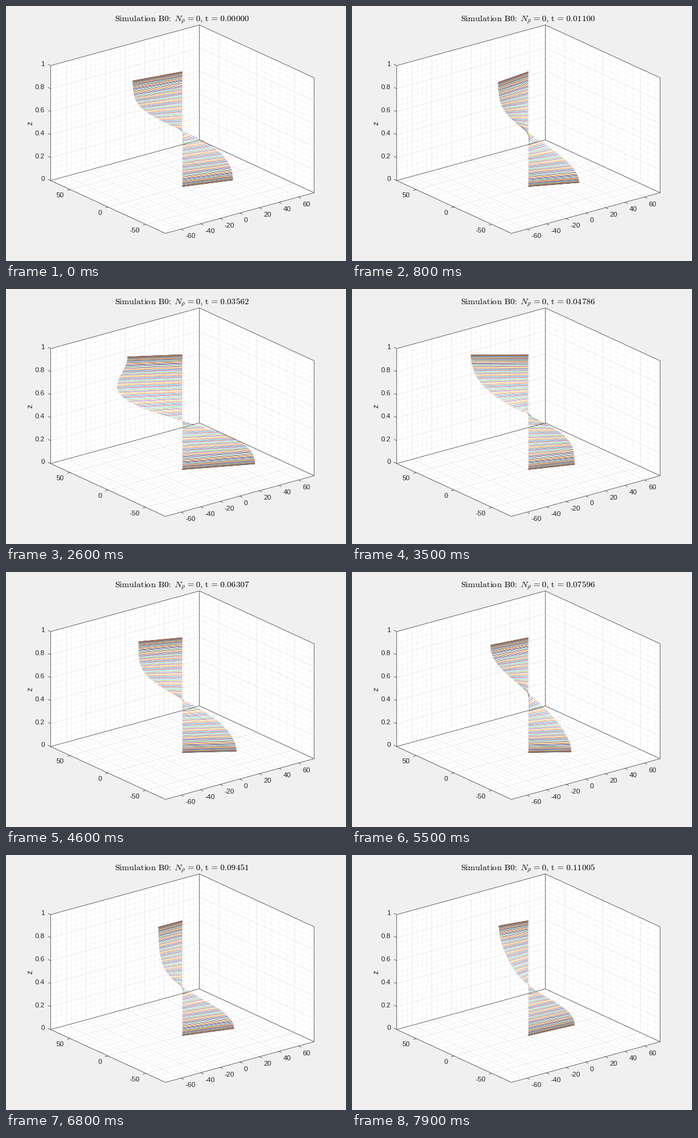
Recreate the animation shown at these times as a matplotlib script. Size 560 by 420 pixels, loop 8000 ms.

```python
import numpy as np
import matplotlib.pyplot as plt
from matplotlib.animation import FuncAnimation
from matplotlib.collections import LineCollection

W, H, DPI = 560, 420, 100
FRAMES, STEP = 80, 100
LOOP = FRAMES * STEP
PT = 72 / DPI                      # points per pixel
INK = "#262626"
LIM = 76                           # half width of the x and y axes
ORDER = ["#0072BD", "#D95319", "#EDB120", "#7E2F8E",
         "#77AC30", "#4DBEEE", "#A2142F"]

plt.rcParams["mathtext.fontset"] = "cm"
plt.rcParams["font.family"] = "Liberation Sans"

fig = plt.figure(figsize=(W / DPI, H / DPI), dpi=DPI, facecolor="#f0f0f0")
ax = fig.add_axes([0, 0, 1, 1])
ax.set_xlim(0, W)
ax.set_ylim(H, 0)
ax.axis("off")


def project(x, y, z):
    """Data coordinates to stage pixels."""
    u, v = x / LIM, y / LIM
    return 290.5 + 122.5 * u - 94.5 * v, 297.5 - 33.5 * u - 43.5 * v - 189.3 * z


def strokes(segs, width=0.7, color=INK, **kw):
    lines = LineCollection(segs, linewidths=width * PT, colors=color,
                           snap=False, **kw)
    ax.add_collection(lines)
    return lines


def label(x, y, s, ha):
    ax.text(x, y + 4, s, ha=ha, va="baseline", size=11.5 * PT, color=INK)


def grid(xs, ys, zs):
    """Grid lines on the floor and the two back walls."""
    segs = []
    for x in xs:
        segs.append([project(x, -LIM, 0), project(x, LIM, 0)])
        segs.append([project(x, LIM, 0), project(x, LIM, 1)])
    for y in ys:
        segs.append([project(-LIM, y, 0), project(LIM, y, 0)])
        segs.append([project(LIM, y, 0), project(LIM, y, 1)])
    for z in zs:
        segs.append([project(-LIM, LIM, z), project(LIM, LIM, z)])
        segs.append([project(LIM, LIM, z), project(LIM, -LIM, z)])
    return segs


def draw_box():
    left, back, right, front = [(-LIM, LIM), (LIM, LIM), (LIM, -LIM), (-LIM, -LIM)]
    low = {c: project(*c, 0) for c in (left, back, right, front)}
    top = {c: project(*c, 1) for c in (left, back, right)}
    outline = [low[left], low[front], low[right], top[right], top[back], top[left]]
    ax.add_patch(plt.Polygon(outline, fc="white", ec="none"))

    xs, ys, zs = range(-60, 61, 20), (-50, 0, 50), np.arange(0, 1.01, 0.2)
    minor = grid([x for x in range(-75, 76, 5) if x % 20],
                 [y for y in range(-70, 71, 10) if y % 50],
                 [k / 20 for k in range(1, 20) if k % 4])
    strokes(minor, 0.7, (0.1, 0.1, 0.1, 0.27), linestyles=[(0, (1, 4))])
    strokes(grid(xs, ys, zs[1:-1]), 0.7, (0.15, 0.15, 0.15, 0.13))

    edges = [[low[left], low[front]], [low[front], low[right]],
             [low[left], low[back]], [low[back], low[right]],
             [top[left], top[back]], [top[back], top[right]]]
    edges += [[low[c], top[c]] for c in top]
    for v in xs:
        x, y = project(v, -LIM, 0)
        edges.append([(x, y), (x + 4.5, y + 2.1)])
        label(x + 7, y + 11, str(v), "left")
    for v in ys:
        x, y = project(-LIM, v, 0)
        edges.append([(x, y), (x - 4.8, y + 1.3)])
        label(x - 10, y + 9, str(v), "right")
    for v in zs:
        x, y = project(-LIM, LIM, v)
        edges.append([(x, y), (x - 4.5, y - 2.1)])
        label(x - 10, y - 3, f"{v:.1g}", "right")
    strokes(edges, 0.65)
    ax.text(40, 193, "z", rotation=90, ha="center", va="center",
            size=12.7 * PT, color=INK)


# Turning points of the flow: time in ms, swing and skew in pixels
KEYS = np.array([
    (0, 88, 5), (400, 118, 8), (900, 53, 17), (1700, 30, 8), (2700, 124, 26),
    (3500, 92, -4), (3850, 110, 2), (4600, 85, 12), (5500, 65, 3),
    (5950, 93, -1), (6800, 59, 20), (7300, 94, 6), (7900, 59, 11)], float)
TIMES, POSES = KEYS[:, 0], KEYS[:, 1:]
SPEEDS = np.gradient(POSES, TIMES, axis=0)

# The solver's clock runs at slightly varying speed
CLOCK = ([0, 1700, 3500, 4600, 5500, 6800, 7900],
         [0, 0.02338, 0.04786, 0.06307, 0.07596, 0.09451, 0.11005])

# Rows crowd towards the walls
ROWS = 128
Z = (1 - np.cos(np.pi * np.arange(ROWS) / (ROWS - 1))) / 2
C1, C2, C3 = (np.cos(k * np.pi * Z) for k in (1, 2, 3))
BASE = np.array([project(0, 0, z) for z in Z])


def wave(ms, period, peak=0):
    return np.cos(2 * np.pi * (ms - peak) / period)


def pose(ms):
    """Swing and skew on a smooth curve through the turning points."""
    k = min(np.searchsorted(TIMES, ms, side="right") - 1, len(TIMES) - 2)
    h = TIMES[k + 1] - TIMES[k]
    s = (ms - TIMES[k]) / h
    return ((1 + 2 * s) * (1 - s) ** 2 * POSES[k]
            + s * (1 - s) ** 2 * h * SPEEDS[k]
            + s * s * (3 - 2 * s) * POSES[k + 1]
            + s * s * (s - 1) * h * SPEEDS[k + 1])


def tips(ms):
    swing, skew = pose(ms)
    slack = 0.3 * (70 - swing)     # a weak swing lets the third mode through
    dx = swing * C1 + skew * C2 + slack * (0.8 + C3)
    dy = (-8.5 - 4.5 * wave(ms, LOOP)) * C1 + (0.5 + 5 * wave(ms, 4600, 900)) * C2
    return BASE + np.column_stack([dx, dy])


draw_box()
rows = strokes([], 0.62, [ORDER[i % 7] for i in range(ROWS)])
title = ax.text(290, 25, "", ha="center", va="baseline", size=14.2 * PT, color="black")
HEAD = (r"$\text{Simulation}\ \text{B0:}\ \,N_\rho\;\text{=}\;\text{0,}"
        r"\ \text{t}\ \text{=}\ \text{%.5f}$")


def update(i):
    ms = i * STEP
    rows.set_segments(np.stack([BASE, tips(ms)], axis=1))
    title.set_text(HEAD % np.interp(ms, *CLOCK))
    return rows, title


anim = FuncAnimation(fig, update, frames=FRAMES, interval=STEP,
                     repeat=True, repeat_delay=0, blit=False)
plt.show()
```
